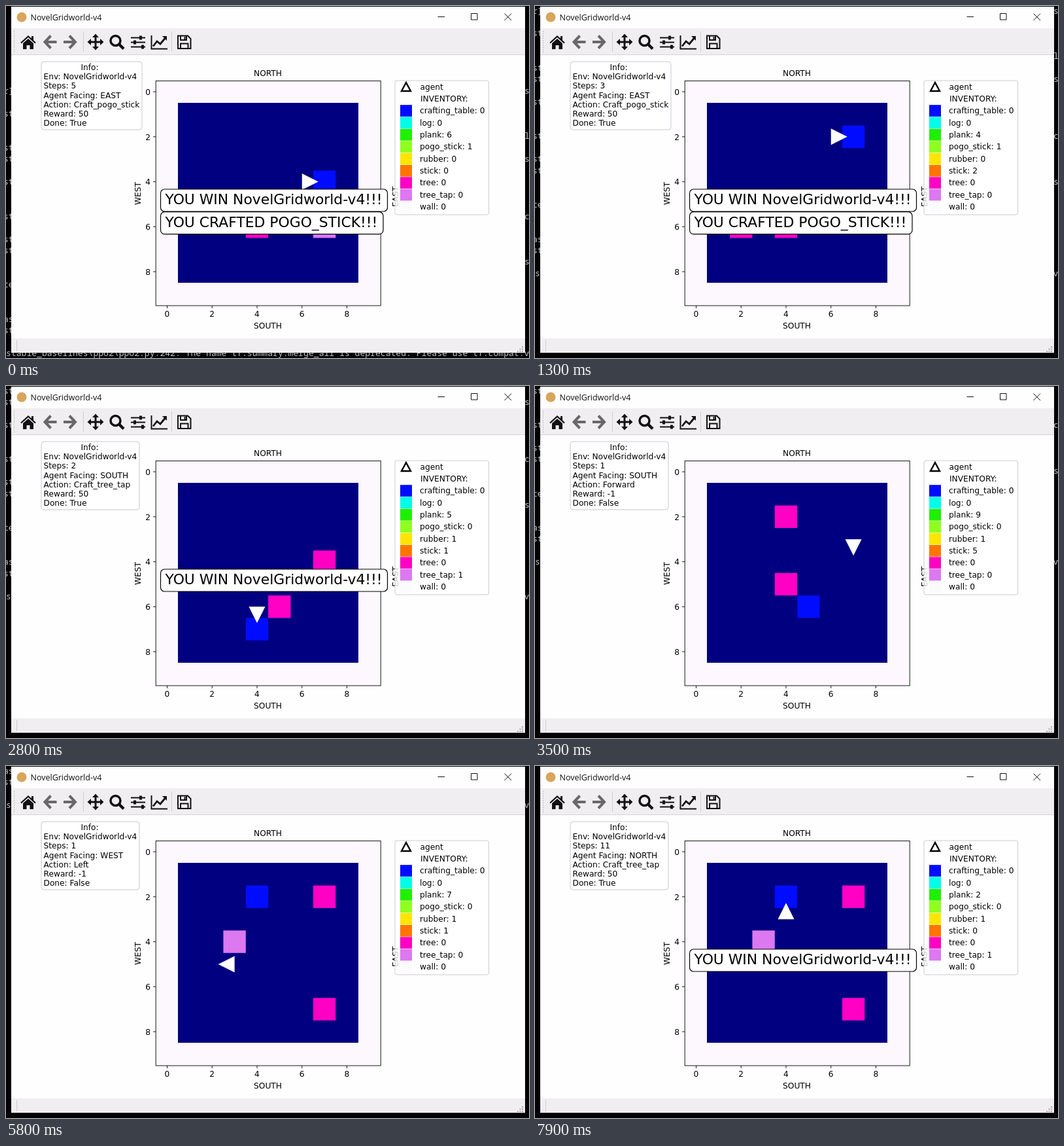
These frames come from a looping animation (800x538 px, 8 s). An HTML page:

```html
<!DOCTYPE html>
<html lang="en">
<head>
<meta charset="utf-8">
<title>NovelGridworld-v4</title>
<style>
html, body { margin: 0; width: 100%; height: 100%; overflow: hidden; background: #040204; }
svg { display: block; }
text { white-space: pre; }
.term { font: 13.08px "Noto Sans Mono", "DejaVu Sans Mono", monospace; fill: #c4c4c4; }
.plot { font: 12.2px "DejaVu Sans", sans-serif; fill: #000; }
.title { font: 12.5px "Open Sans", sans-serif; fill: #111; }
.win { font-size: 21.85px; }
.mid { text-anchor: middle; }
.end { text-anchor: end; }
.line { fill: none; stroke: #111; }
</style>
</head>
<body>
<svg width="800" height="538" viewBox="0 0 800 538">
  <g id="term" class="term"></g>

  <!-- window -->
  <rect x="8" y="1" width="786" height="529" fill="#fefefe"/>
  <rect x="8" y="34" width="786" height="40.5" fill="#f0eef0"/>
  <path d="M8 74.5H794" stroke="#d4d2d4"/>
  <rect x="8" y="508" width="786" height="22" fill="#f0eef0"/>
  <path d="M16.5 511V528" stroke="#d0d0d0"/>
  <path d="M790 520V529M786.500 523.500V529M783 527V529" stroke="#aaa" stroke-width="2" stroke-dasharray="2 1.500"/>
  <circle cx="24" cy="17" r="7.5" fill="#d9a45c"/>
  <text class="title" x="37.500" y="21.500">NovelGridworld-v4</text>
  <path class="line" d="M660.500 16.500H671M711.500 11.500H721V21H711.500ZM762.500 11.500L773 22M773 11.500L762.500 22"/>

  <!-- toolbar -->
  <path d="M12.500 38V72" stroke="#b4b4b4" stroke-dasharray="1.500 2"/>
  <path d="M118.500 39V70M253.500 39V70" stroke="#d0ced0"/>
  <g fill="#111">
    <path d="M26 57L34 50L42 57V66H36.500V60H31.500V66H26ZM39 46H42V54L39 51Z"/>
    <path class="line" stroke-width="2.300" d="M23 56.500L34 46.500L45 56.500"/>
    <g class="line" style="stroke:#686868" stroke-width="4">
      <path d="M68.500 45.500L59.500 55L68.500 64.500M60 55H77.500"/>
      <path d="M97 45.500L106 55L97 64.500M105.500 55H88"/>
    </g>
    <path class="line" stroke-width="3" d="M137 46V64M128 55H146"/>
    <path d="M137 42.500L142 48H132ZM137 67.500L142 62H132ZM124.500 55L130 50V60ZM149.500 55L144 50V60Z"/>
    <circle class="line" cx="167.500" cy="53" r="7.500" stroke-width="3.500"/>
    <path class="line" stroke-width="4.500" d="M173 58.500L180 65.500"/>
    <path class="line" stroke-width="2" d="M191 48.500H213M191 55.500H213M191 62.500H213"/>
    <path d="M204 45.500H208V51.500H204ZM195 52.500H199V58.500H195ZM207 59.500H211V65.500H207Z"/>
    <path class="line" stroke-width="2" d="M222.500 45V65.500H247"/>
    <path class="line" stroke-width="2.800" d="M225 61.500L231 54L236 58L244 48.500"/>
    <path d="M239 46H246V53Z"/>
    <path class="line" stroke-width="2" d="M263 45.500H278L282.500 50V65H263ZM267 46V52H276V46M267 65V57.500H278.500V65M273.500 47V51"/>
  </g>

  <!-- axes -->
  <g class="plot">
    <rect x="229.200" y="114.500" width="344" height="343.500" fill="#fdf8fe"/>
    <rect x="263" y="148" width="276" height="275" fill="#000080"/>
    <g id="grid"></g>
    <rect x="229.200" y="114.500" width="344" height="343.500" fill="none" stroke="#000" stroke-width=".9"/>
    <g id="ticks"></g>
    <text class="mid" x="400.500" y="106.500">NORTH</text>
    <text class="mid" x="400.500" y="492.800">SOUTH</text>
    <text class="mid" transform="translate(205.500 286.500) rotate(-90)">WEST</text>
    <text class="mid" transform="translate(600 291.500) rotate(-90)">EAST</text>
    <rect x="595" y="114" width="143.500" height="205" rx="3" fill="#fff" fill-opacity=".8" stroke="#ccc"/>
    <path d="M612 117L619 130H605Z" fill="#fff" stroke="#000" stroke-width="2.400"/>
    <g id="legend"></g>
    <g id="info"></g>
    <g id="banner"></g>
  </g>
</svg>

<script>
const LOOP = 8000, STEP = 175, CELL = 34.37;
const ITEMS = {
  crafting_table: '#000cff', log: '#00ffe8', plank: '#20f000', pogo_stick: '#90ff20', rubber: '#ffe600',
  stick: '#ff7500', tree: '#ff00c4', tree_tap: '#dc78f0', wall: '#fbfafd'
};
const DIRS = ['NORTH', 'EAST', 'SOUTH', 'WEST'];
const MOVES = [[0, -1], [1, 0], [0, 1], [-1, 0]];
const ACTIONS = { F: 'Forward', L: 'Left', R: 'Right', P: 'Craft_pogo_stick', T: 'Craft_tree_tap' };

// Each episode: time of its first step, agent [col, row, dir], stock, objects, actions
const EPISODES = [
  { t: -1625, agent: [2, 4, 1], plank: 8, stick: 4, acts: 'FFFFP',
    things: [['crafting_table', 7, 4], ['tree', 4, 6], ['tree_tap', 7, 6]] },
  { t: 475, agent: [4, 2, 1], plank: 6, stick: 6, acts: 'FFP',
    things: [['crafting_table', 7, 2], ['tree', 2, 6], ['tree', 4, 6]] },
  { t: 2050, agent: [4, 6, 3], plank: 10, stick: 2, acts: 'LT',
    things: [['crafting_table', 4, 7], ['tree', 7, 4], ['tree', 5, 6]] },
  { t: 3450, agent: [7, 2, 2], plank: 9, stick: 5, acts: 'FFFFRFP',
    things: [['crafting_table', 5, 6], ['tree', 4, 2], ['tree', 4, 5]] },
  { t: 5725, agent: [3, 5, 0], plank: 7, stick: 1, acts: 'LRFLRRFLFFT',
    things: [['crafting_table', 4, 2], ['tree', 7, 2], ['tree', 7, 7], ['tree_tap', 3, 4]] }
];

// Terminal rows counted up from the lowest: [row, left text, right text]
const ROWS = [[2, 'st', ''], [3, 'as', ''], [6, 'te', ''], [8, '', 's'], [9, 'st', ''], [10, 'st', ''],
  [12, 'st', 'c'], [15, 'st', ''], [17, 'st', 's'], [18, 'st', ''], [19, '', 'l'], [21, 'st', ''], [23, 'r]', 's']];
const LAST_LINE = 'stable_baselines\\ppo2\\ppo2.py:242: The name tf.summary.merge_all is deprecated. Please use tf.compat.v1';
const SCROLL = [[300, 0], [1100, 7], [1850, 7], [2050, 10], [2225, 11], [3200, 12], [3450, 15],
  [4550, 24], [5200, 25], [5500, 25], [5725, 27], [7150, 32]];

const el = id => document.getElementById(id);
const col = c => 246.5 + CELL * c;
const row = r => 131.1 + CELL * r;
const text = (x, y, s, cls = '') => `<text x="${x}" y="${y}" class="${cls}">${s}</text>`;
const rect = (x, y, w, h, fill, more = '') => `<rect x="${x}" y="${y}" width="${w}" height="${h}" fill="${fill}" ${more}/>`;

function play({ t, agent, plank, stick, acts, things }) {
  let [x, y, dir] = agent;
  const inv = { plank, stick, rubber: 1 };
  return [...acts].map((act, i) => {
    if (act === 'L') dir = (dir + 3) % 4;
    if (act === 'R') dir = (dir + 1) % 4;
    if (act === 'F') {
      const nx = x + MOVES[dir][0], ny = y + MOVES[dir][1];
      if (!things.some(o => o[1] === nx && o[2] === ny)) [x, y] = [nx, ny];
    }
    if (act === 'P') { inv.plank -= 2; inv.stick -= 4; inv.rubber = 0; inv.pogo_stick = 1; }
    if (act === 'T') { inv.plank -= 5; inv.stick -= 1; inv.tree_tap = 1; }
    return { t: t + i * STEP, step: i + 1, act, x, y, dir, things, inv: { ...inv } };
  });
}
const states = EPISODES.flatMap(play);

function linesAt(t) {
  const i = SCROLL.findIndex(k => k[0] > t);
  if (i === 0) return 0;
  if (i < 0) return SCROLL[SCROLL.length - 1][1];
  const [t0, a] = SCROLL[i - 1], [t1, b] = SCROLL[i];
  return Math.round(a + (b - a) * (t - t0) / (t1 - t0));
}

function drawTerm(lines) {
  const y = k => 535 - 17.45 * (k + lines);
  el('term').innerHTML = text(0, y(0), LAST_LINE) +
    ROWS.map(([k, left, right]) => text(-4, y(k), left) + text(793, y(k), right)).join('');
}

function banner(y, w, s) {
  return rect(236.5, y, w, 34, '#fff', 'rx="6" stroke="#000" stroke-width="1.2"') + text(243.5, y + 23.3, s, 'win');
}

function drawState({ step, act, x, y, dir, things, inv }) {
  const won = act === 'P' || act === 'T';
  el('grid').innerHTML =
    things.map(([name, c, r]) => rect(col(c - .5), row(r - .5), CELL, CELL, ITEMS[name])).join('') +
    `<path transform="translate(${col(x)} ${row(y)}) rotate(${dir * 90})" d="M-12.5 0H12.500L0 -25Z" fill="#fff"/>`;

  el('legend').innerHTML = text(633.5, 127.8, 'agent') + text(634, 146.2, 'INVENTORY:') +
    Object.entries(ITEMS).map(([name, fill], i) => {
      const cy = 160 + 18.35 * i;
      return rect(603, cy - 8.8, 18, 17.8, fill) + text(633, cy + 4.3, `${name}: ${inv[name] || 0}`);
    }).join('');

  const info = ['Env: NovelGridworld-v4', `Steps: ${step}`, `Agent Facing: ${DIRS[dir]}`,
    `Action: ${ACTIONS[act]}`, `Reward: ${won ? 50 : -1}`, `Done: ${won ? 'True' : 'False'}`];
  el('info').innerHTML = rect(54, 85, act === 'P' ? 154 : 150, 104, '#fff', 'rx="4" stroke="#ccc6d0"') +
    text(114.5, 98, 'Info:') + info.map((s, i) => text(57.5, 112.2 + 14.15 * i, s)).join('');

  el('banner').innerHTML = (won ? banner(280, 347, 'YOU WIN NovelGridworld-v4!!!') : '') +
    (act === 'P' ? banner(314.7, 340.5, 'YOU CRAFTED POGO_STICK!!!') : '');
}

el('ticks').innerHTML = [0, 2, 4, 6, 8].map(n =>
  `<path d="M${col(n)} 458v4M229 ${row(n)}h-4" stroke="#000" stroke-width=".9"/>` +
  text(col(n), 475.3, n, 'mid') + text(221, row(n) + 4.7, n, 'end')).join('');

let shown, scrolled;
function frame(now) {
  const t = now % LOOP;
  const state = states.filter(s => s.t <= t).pop();
  const lines = linesAt(t);
  if (state !== shown) drawState(shown = state);
  if (lines !== scrolled) drawTerm(scrolled = lines);
  requestAnimationFrame(frame);
}
frame(0);
</script>
</body>
</html>
```
